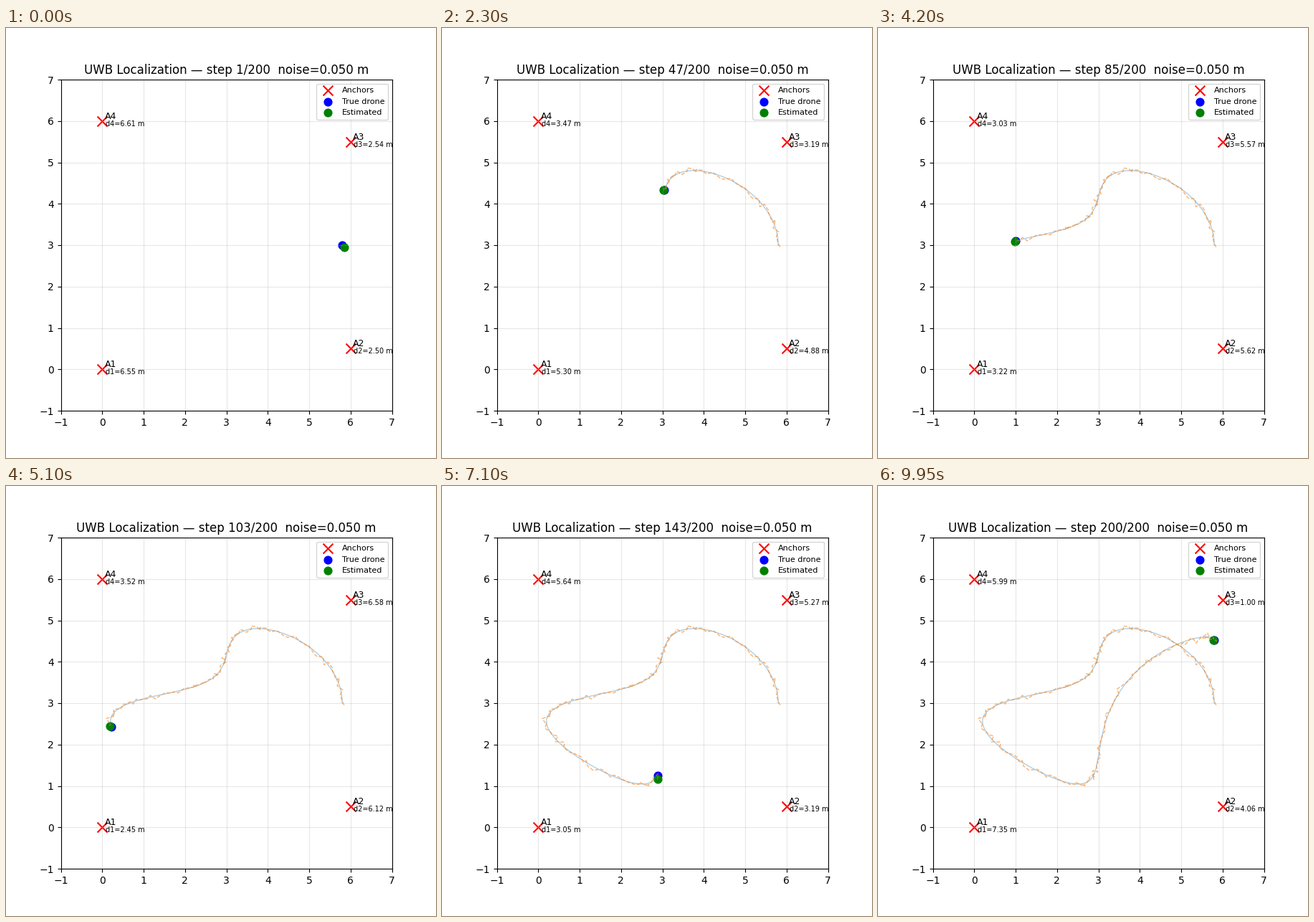
A matplotlib script for the animation above (10 s loop, 600x600 px).

```python
import numpy as np
import matplotlib.pyplot as plt
from matplotlib.animation import FuncAnimation

STEPS = 200
NOISE = 0.05
ANCHORS = np.array([[0, 0], [6, 0.5], [6, 5.5], [0, 6]], dtype=float)


def flight_path():
    t = np.linspace(0, 2 * np.pi, STEPS)
    x = 3 + 2.2 * np.cos(t) + 0.6 * np.cos(3 * t)
    y = 3 + 1.6 * np.sin(1.2 * t) + 0.5 * np.sin(2.5 * t)
    return np.column_stack([x, y])


def trilaterate(d):
    """Linear least squares, relative to the first anchor."""
    a = 2 * (ANCHORS[1:] - ANCHORS[0])
    sq = (ANCHORS ** 2).sum(axis=1)
    b = d[0] ** 2 - d[1:] ** 2 + sq[1:] - sq[0]
    return np.linalg.lstsq(a, b, rcond=None)[0]


np.random.seed(42)
true = flight_path()
ranges = np.linalg.norm(true[:, None] - ANCHORS, axis=2)
ranges += NOISE * np.random.randn(STEPS, len(ANCHORS))
est = np.array([trilaterate(d) for d in ranges])

fig, ax = plt.subplots(figsize=(6, 6), dpi=100)
ax.set_xlim(-1, 7)
ax.set_ylim(-1, 7)
ax.set_aspect("equal")
ax.grid(True, alpha=0.3)

ax.scatter(*ANCHORS.T, c="red", marker="x", s=100, label="Anchors")
true_dot = ax.scatter([], [], c="blue", s=60, label="True drone")
est_dot = ax.scatter([], [], c="green", s=60, label="Estimated")
true_line, = ax.plot([], [], "-", lw=1, alpha=0.35)
est_line, = ax.plot([], [], "--", lw=1, alpha=0.6)

range_texts = []
for k, (x, y) in enumerate(ANCHORS, 1):
    ax.text(x + 0.06, y + 0.05, f"A{k}", fontsize=9)
    range_texts.append(ax.text(x + 0.08, y - 0.12, "", fontsize=7))

ax.legend(loc="upper right", fontsize=8)
title = ax.set_title("")


def update(i):
    true_dot.set_offsets(true[i])
    est_dot.set_offsets(est[i])
    true_line.set_data(*true[:i + 1].T)
    est_line.set_data(*est[:i + 1].T)
    for k, (label, d) in enumerate(zip(range_texts, ranges[i]), 1):
        label.set_text(f"d{k}={d:.2f} m")
    title.set_text(f"UWB Localization — step {i + 1}/{STEPS}  noise={NOISE:.3f} m")
    return [true_dot, est_dot, true_line, est_line, title, *range_texts]


anim = FuncAnimation(fig, update, frames=STEPS, init_func=lambda: update(0),
                     interval=50, repeat=True, repeat_delay=0, blit=False)
plt.show()
```
